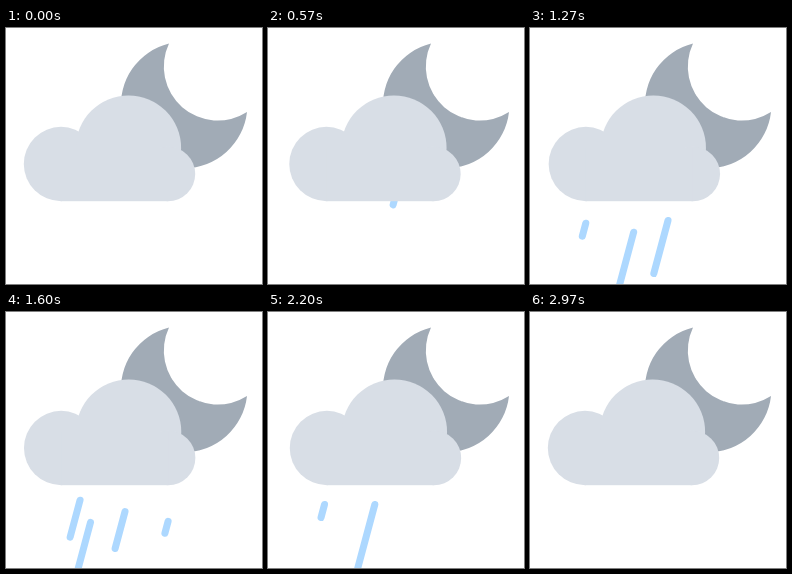
Recreate the animation shown at these times as an HTML page. Size 256 px wide and 256 px high, loop 3.01 s.

```html
<!DOCTYPE html>
<html lang="en">
<head>
<meta charset="utf-8">
<title>Rainy night</title>
<style>
  html, body { margin: 0; width: 100%; height: 100%; overflow: hidden; background: #fff; }
  svg { display: block; width: 100vw; height: 100vh; }
</style>
</head>
<body>
<svg viewBox="0 0 256 256">
  <clipPath id="below"><rect y="150" width="256" height="106"/></clipPath>
  <path fill="#a1abb6" d="M163 15.5A63.25 63.25 0 1 0 241 84A54 54 0 0 1 163 15.5Z"/>
  <g clip-path="url(#below)">
    <g id="rain" stroke="#add8ff" stroke-width="7" stroke-linecap="round"></g>
  </g>
  <g id="cloud" fill="#d8dee6">
    <circle cx="55" cy="136" r="37.2"/>
    <circle cx="122.5" cy="120" r="52.6"/>
    <circle cx="162" cy="146" r="27.2"/>
    <rect x="55" y="120" width="107" height="53.2"/>
  </g>
</svg>
<script>
const LOOP = 3010;
const SWAY = 1500;
const SPEED = 0.39;   // px per ms, downwards
const SLANT = 0.268;
const BASE = 173;     // lower edge of the cloud

// x where the lane crosses y = 200, drop height, times the drop's top leaves the cloud
const lanes = [
  { x: 54.5, len: 13, starts: [266, 960, 1214, 2151, 2700] },
  { x: 70.9, len: 37, starts: [722, 1562, 2400] },
  { x: 87.3, len: 53, starts: [281, 1000, 1505, 2640] },
  { x: 104.8, len: 75, starts: [222, 1191, 2151, 2700] },
  { x: 118.9, len: 37, starts: [656, 1533, 2480] },
  { x: 136, len: 53, starts: [240, 1221, 1840, 2380] },
  { x: 160.2, len: 13, starts: [304, 704, 1760, 2560] },
  { x: 164.6, len: 12, starts: [1508] }
];

const rain = document.getElementById('rain');
const cloud = document.getElementById('cloud');

const drops = lanes.flatMap(({ x, len, starts }) => starts.map(start => {
  const line = document.createElementNS('http://www.w3.org/2000/svg', 'line');
  line.setAttribute('x1', x);
  line.setAttribute('y1', 200);
  line.setAttribute('x2', x - len * SLANT);
  line.setAttribute('y2', 200 + len);
  rain.append(line);
  return { line, start };
}));

function draw(t) {
  const sway = 2 * (1 - Math.cos(2 * Math.PI * t / SWAY));
  cloud.setAttribute('transform', `translate(${sway} 0)`);
  for (const { line, start } of drops) {
    const fall = BASE - 200 + (t - start) * SPEED;
    line.setAttribute('transform', `translate(${-fall * SLANT} ${fall})`);
  }
}

const begin = performance.now();
function tick() {
  draw((performance.now() - begin) % LOOP);
  requestAnimationFrame(tick);
}
draw(0);
requestAnimationFrame(tick);
</script>
</body>
</html>
```
